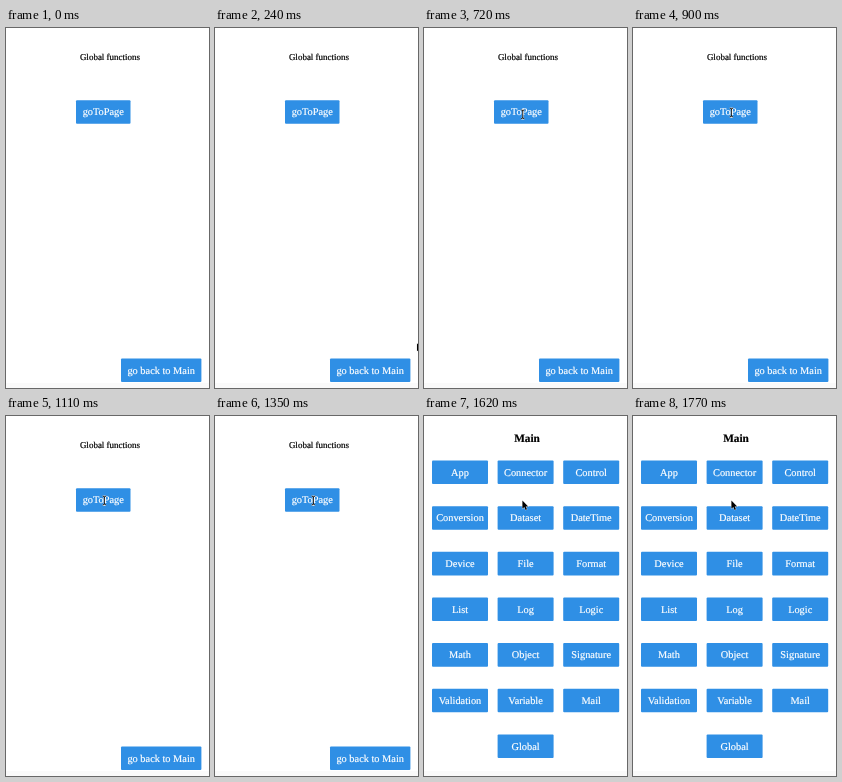
Animation, 203 px wide and 360 px high, one loop 1800 ms. Source, as an HTML page:

```html
<!DOCTYPE html>
<html lang="en">
<head>
<meta charset="utf-8">
<style>
html, body { margin: 0; width: 100%; height: 100%; overflow: hidden; background: #fff; }
svg { display: block; width: 203px; height: 360px; }
text {
  font: 10.35px "Liberation Serif", Times, serif;
  text-anchor: middle;
  text-rendering: geometricPrecision;
  stroke: #000;
  stroke-width: .2;
}
.button rect { fill: #2f8fe5; }
.button text { fill: #fff; stroke: #fff; }
</style>
</head>
<body>
<svg viewBox="0 0 203 360">
  <rect y="355" width="203" height="5" fill="#fafafa"/>
  <g id="detail">
    <text x="104" y="32.2" style="font-size:9px">Global functions</text>
  </g>
  <g id="main">
    <text x="103" y="26.2" style="font-size:11.3px;font-weight:bold">Main</text>
  </g>
  <path id="arrow" d="M0 0V8.2L1.9 6.5L3.2 9.4L4.6 8.8L3.3 6H5.8Z" stroke="#fff" stroke-width=".8" paint-order="stroke"/>
  <g id="beam" fill="none">
    <path id="bar" d="M-1.7 -4.4Q0 -4.4 0 -3.2Q0 -4.4 1.7 -4.4M0 -3.5V3.5M-1.7 4.4Q0 4.4 0 3.2Q0 4.4 1.7 4.4"/>
    <use href="#bar" stroke="#fff" stroke-width="1.6"/>
    <use href="#bar" stroke="#000" stroke-width=".9"/>
  </g>
</svg>
<script>
const LOOP = 1800, ENTER = 240, TRAVEL = 520, SWITCH = 1440;
const [detail, main, arrow, beam] =
  ['detail', 'main', 'arrow', 'beam'].map(id => document.getElementById(id));

function button(page, label, x, y, w) {
  page.insertAdjacentHTML('beforeend', `<g class="button">
    <rect x="${x}" y="${y}" width="${w}" height="23.6" rx="1"/>
    <text x="${x + w / 2}" y="${y + 15.2}">${label}</text></g>`);
}

button(detail, 'goToPage', 70, 72.2, 54.5);
button(detail, 'go back to Main', 115, 330.4, 80.4);

const labels = ('App Connector Control Conversion Dataset DateTime Device File Format ' +
  'List Log Logic Math Object Signature Validation Variable Mail').split(' ');
labels.forEach((label, i) =>
  button(main, label, 8 + i % 3 * 65.6, 44.5 + Math.floor(i / 3) * 45.65, 56));
button(main, 'Global', 73.6, 318.4, 56);

const show = (el, on) => el.style.display = on ? '' : 'none';

function draw(now) {
  const t = now % LOOP;
  const u = Math.min(1, Math.max(0, (t - ENTER) / TRAVEL));
  // The pointer eases out a little faster sideways than upwards.
  const x = 98.4 + 104 * (1 - u) ** 2.2, y = 84.5 + 231.5 * (1 - u) ** 1.87;
  const onMain = t >= SWITCH;
  const overLabel = !onMain && y < 90;

  show(detail, !onMain);
  show(main, onMain);
  show(arrow, t >= ENTER && !overLabel);
  show(beam, overLabel);
  for (const pointer of [arrow, beam])
    pointer.setAttribute('transform', `translate(${x} ${y})`);
  requestAnimationFrame(() => draw(performance.now() - start));
}

const start = performance.now();
draw(0);
</script>
</body>
</html>
```
